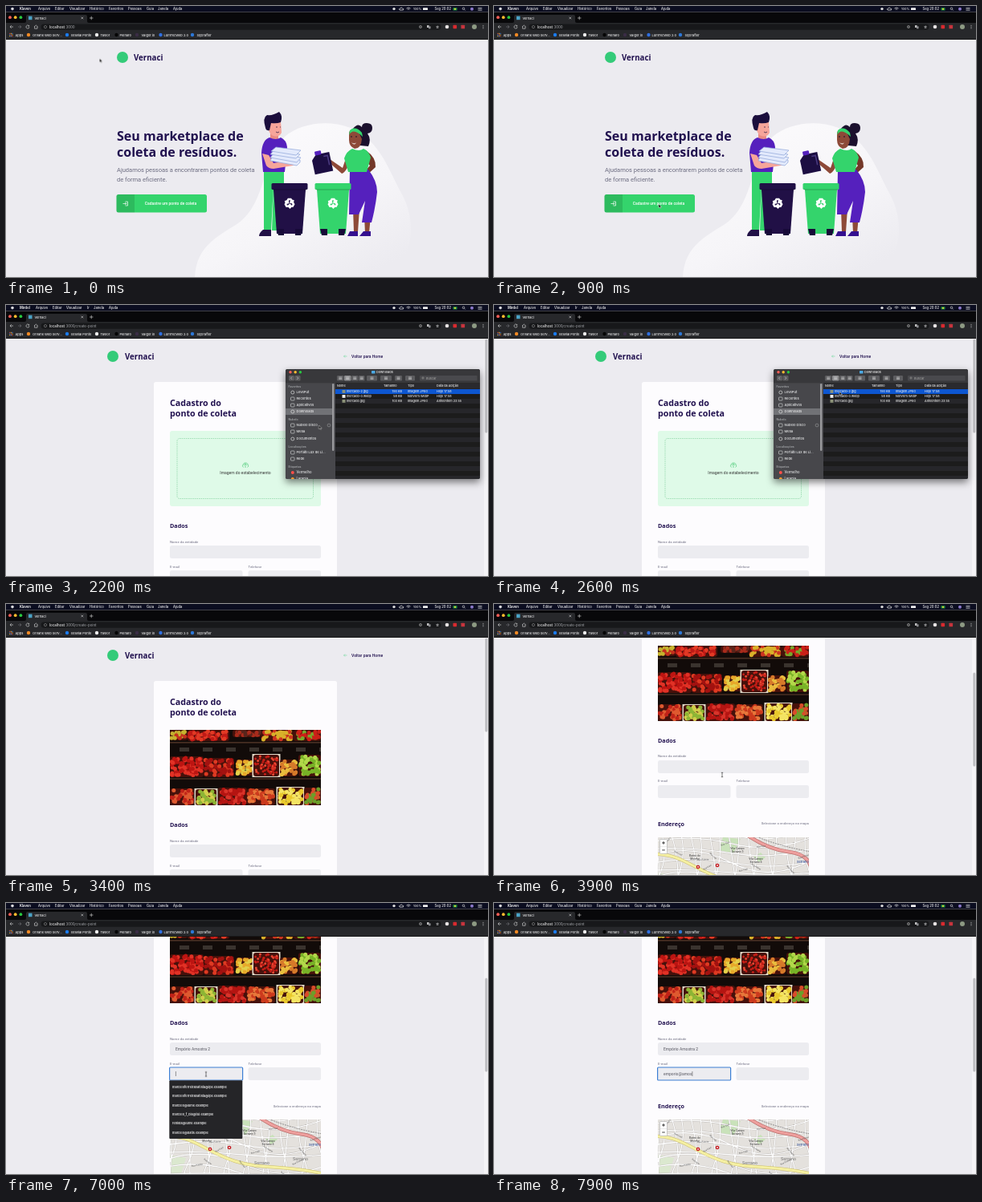
Animation, 600 px wide and 338 px high, one loop 8 s. Source, as an HTML page:

```html
<!DOCTYPE html>
<html lang="pt-BR">
<head>
<meta charset="utf-8">
<title>Vernaci</title>
<style>
html, body { margin: 0; width: 100%; height: 100%; overflow: hidden; background: #ecebf0; }
svg { display: block; width: 600px; height: 338px; }
text { white-space: pre; }
.ui { font-family: Inter, "Liberation Sans", sans-serif; font-size: 4.15px; font-weight: 500; fill: #e9e9ea; }
.body { font-family: Roboto, Arial, sans-serif; fill: #6c6c80; font-size: 4.35px; }
.head { font-family: "Open Sans", "Noto Sans", sans-serif; font-weight: 700; fill: #21114f; }
.field { fill: #ececf0; }
.value { font-size: 5px; fill: #55555f; }

.home, .create, .files, .web, .photo, .arrow, .beam, .ghost { animation: 8s step-end infinite; }
.create, .files, .photo, .beam, .ghost { visibility: hidden; }
.home { animation-name: home; }
.create { animation-name: create; }
.files { animation-name: files; }
.web { animation-name: web; }
.photo { animation-name: photo; }
.arrow { animation-name: arrow; }
.beam { animation-name: beam; }
.ghost { animation-name: ghost; }
@keyframes home { 0% { visibility: visible } 13.75% { visibility: hidden } }
@keyframes create { 0% { visibility: hidden } 13.75% { visibility: visible } }
@keyframes files { 0% { visibility: hidden } 25% { visibility: visible } 41.875% { visibility: hidden } }
@keyframes web { 0% { visibility: visible } 25% { visibility: hidden } 41.875% { visibility: visible } }
@keyframes photo { 0% { visibility: hidden } 39.4% { visibility: visible } }
@keyframes arrow { 0% { visibility: visible } 16% { visibility: hidden } 26% { visibility: visible } 42.5% { visibility: hidden } }
@keyframes beam { 0% { visibility: hidden } 42.5% { visibility: visible } 58% { visibility: hidden } 79.5% { visibility: visible } 91.25% { visibility: hidden } }
@keyframes ghost { 0% { visibility: hidden } 34.5% { visibility: visible } 39.4% { visibility: hidden } }

.scroll { animation: scroll 8s linear infinite; }
@keyframes scroll { 0%, 43.75% { transform: translateY(0) } 48.75% { transform: translateY(-105px) } 52.5%, 100% { transform: translateY(-126px) } }
.thumb { animation: thumb 8s linear infinite; }
@keyframes thumb { 0%, 43.75% { transform: translateY(0) } 48.75% { transform: translateY(43px) } 52.5%, 100% { transform: translateY(51px) } }
.arrowPath { animation: arrowPath 8s ease-in-out infinite; }
@keyframes arrowPath {
  0%, 2.5% { transform: translate(116.5px, 65.5px) }
  9.5%, 16% { transform: translate(205px, 247px) }
  26% { transform: translate(380px, 160px) }
  31%, 34.5% { transform: translate(430px, 108px) }
  39.4%, 100% { transform: translate(298px, 205px) }
}
.beamPath { animation: beamPath 8s ease-in-out infinite; }
@keyframes beamPath {
  0%, 42.5% { transform: translate(298px, 205px) }
  47.5%, 52.5% { transform: translate(284px, 213px) }
  56.25%, 79.5% { transform: translate(270px, 183px) }
  83.75%, 100% { transform: translate(249px, 213.5px) }
}
</style>
</head>
<body>
<svg viewBox="0 0 600 338">
  <defs>
    <linearGradient id="blob" x1=".25" y1=".1" x2=".85" y2=".95">
      <stop offset="0" stop-color="#fbfafc"/><stop offset=".55" stop-color="#f6f5f8"/><stop offset="1" stop-color="#ecebf0"/>
    </linearGradient>
    <clipPath id="view"><rect y="42" width="600" height="296"/></clipPath>
    <clipPath id="photoBox"><rect x="204" y="157" width="188" height="94"/></clipPath>
    <clipPath id="mapBox"><rect x="204" y="396" width="188" height="109" rx="1"/></clipPath>
    <clipPath id="filesBox"><rect x="348" y="80" width="242" height="137" rx="2.5"/></clipPath>
    <filter id="shadow" x="-10%" y="-10%" width="120%" height="130%"><feDropShadow dx="0" dy="4" stdDeviation="5" flood-opacity=".5"/></filter>
    <g id="recycle" fill="none" stroke="#fff" stroke-width="2.6">
      <path id="bend" d="M-3.6 -1.4L-1.4 -5H1.4L3 -2.4M4.5 -4.2L3.6 -.8L.4 -1.8"/>
      <use href="#bend" transform="rotate(120)"/><use href="#bend" transform="rotate(240)"/>
    </g>
    <g id="bin">
      <rect x="-22.5" width="45" height="8" rx="1.5"/>
      <path d="M-20 8H20L16 63H-16Z"/>
      <path d="M-16 57h9v8h-7zM7 57h9l-2 8H7z" fill="#170a38"/>
      <path d="M-21 8H21" stroke="#000" stroke-opacity=".25"/>
      <use href="#recycle" transform="translate(0 25)"/>
    </g>
  </defs>
  <rect width="600" height="338" fill="#ecebf0"/>

  <g class="home">
    <path fill="url(#blob)" d="M235 338C237 303 258 290 286 273C325 248 318 190 347 163C374 140 426 140 453 168C472 188 478 207 493 235C512 270 505 312 482 338Z"/>
    <circle cx="145" cy="64" r="7" fill="#34cb79"/>
    <g class="head">
      <text x="159" y="67.7" font-size="9.7">Vernaci</text>
      <text font-size="16"><tspan x="138" y="168">Seu marketplace de</tspan><tspan x="138" y="187.5">coleta de resíduos.</tspan></text>
    </g>
    <g class="body">
      <text font-size="7.5"><tspan x="138" y="207">Ajudamos pessoas a encontrarem pontos de coleta</tspan><tspan x="138" y="219">de forma eficiente.</tspan></text>
      <rect x="137.5" y="235" width="112.5" height="22.5" rx="2.5" fill="#34d46c"/>
      <path d="M160 235v22.5h-20a2.5 2.5 0 0 1-2.5-2.5v-17.5a2.5 2.5 0 0 1 2.5-2.5z" fill="#000" opacity=".12"/>
      <path d="M148.5 244h3v5h-3M145.5 246.5h4.3m-1.5-1.6l1.6 1.6l-1.6 1.6" fill="none" stroke="#fff" stroke-width=".7"/>
      <text x="205" y="248.3" text-anchor="middle" font-size="5" font-weight="500" fill="#fff">Cadastre um ponto de coleta</text>
    </g>
    <!-- man -->
    <path d="M321 206H346V230L338 280H331L333 225L330 280H321Z" fill="#34d46c"/>
    <path d="M320 279H330V287H315Q315 283 320 279Z" fill="#211046"/>
    <path d="M329 156H339V167H329Z" fill="#e98b83"/>
    <path d="M326 144H342L343 158Q340 164 333 162Q327 160 326 150Z" fill="#f6a59a"/>
    <path d="M323 152Q319 139 325 136Q332 137 340 132Q345 137 342 145Q337 147 330 146L328 155Q324 156 323 152Z" fill="#1a0d3c"/>
    <path d="M336 151h2m3 0h1M336 157q2 2 4 0" stroke="#1a0d3c" stroke-width=".7" fill="none"/>
    <path d="M328 164Q336 168 342 164Q349 167 350 176L347 207H320L318 183Q319 167 328 164Z" fill="#5520bd"/>
    <path d="M319 184L327 186L333 196L355 192L363 196L357 199L333 203Q327 203 324 199Z" fill="#f6a59a"/>
    <g fill="#e3eafc" stroke="#8ea5d8" stroke-width=".7">
      <path d="M329 193L362 199L366 195V192L332 186Z"/>
      <path d="M329 189L362 195L367 189L334 183Z"/><path d="M329 185L361 190L366 185L334 179Z"/>
      <path d="M330 181L361 186L367 180L336 176Z"/>
    </g>
    <!-- woman -->
    <path d="M449 146q7 0 7 6t-6 7q5 7 1 16l-20-2 1-20q6-8 11-2q0-5 6-5z" fill="#1b102d"/>
    <path d="M427 158Q429 152 438 155L443 166Q442 178 434 178Q427 175 427 167Z" fill="#8d4938"/>
    <path d="M427 161Q432 151 444 163L443 158Q435 149 428 155Z" fill="#34d46c"/>
    <path d="M430 170q4 3 6 0q-2 5-6 0z" fill="#fff"/>
    <path d="M429 163h2m4 0h2" stroke="#1b102d"/>
    <path d="M425 184L419 202L403 191L402 195L418 209Q423 208 430 191Z" fill="#8d4938"/>
    <path d="M448 180Q461 189 460 201L449 211L446 207L453 199L445 190Z" fill="#743829"/>
    <path d="M432 253H440L438 282H433ZM446 262H454L452 283H447Z" fill="#8d4938"/>
    <path d="M428 204H451Q462 218 462 232Q460 251 455 270H443L447 243L439 260H427Z" fill="#5520bd"/>
    <path d="M431 178Q440 182 445 178Q452 181 454 189L449 207H426L421 190Q424 181 431 178Z" fill="#34d46c"/>
    <path d="M428 281h10v6h-13zM445 281h9v6h-14z" fill="#35108f"/>
    <g transform="rotate(-12 394 196)">
      <path d="M382 190L388 184H405V208H382Z" fill="#1c0e42"/>
      <rect x="387" y="180" width="8" height="5" rx="1" fill="#5520bd"/>
      <path d="M397 188H402V200" fill="none" stroke="#4a3a80" stroke-width="1.5"/>
    </g>
    <use href="#bin" transform="translate(353 221)" fill="#211046"/>
    <use href="#bin" transform="translate(407 221)" fill="#34d46c"/>
  </g>

  <g class="create" clip-path="url(#view)">
    <g class="scroll">
      <circle cx="133" cy="64" r="7" fill="#34cb79"/>
      <text class="head" x="148" y="67.7" font-size="9.7">Vernaci</text>
      <path d="M424.5 64h-4m1.5-1.5l-1.5 1.5l1.5 1.5" stroke="#70d99b" stroke-width=".6" fill="none"/>
      <rect x="184" y="96" width="228" height="480" rx="2.5" fill="#fdfcfe"/>
      <g class="head">
        <text font-size="10.7"><tspan x="204" y="126.3">Cadastro do</tspan><tspan x="204" y="139.3">ponto de coleta</tspan></text>
        <text x="204" y="277.6" font-size="7.2">Dados</text>
        <text x="204" y="381.6" font-size="7.2">Endereço</text>
      </g>
      <rect x="204" y="157" width="188" height="94" rx="3" fill="#dffae8"/>
      <rect x="213" y="166.5" width="169.5" height="75" rx="3" fill="none" stroke="#79cd98" stroke-width=".6" stroke-dasharray="1.6 1"/>
      <path d="M298 203v-5m-2 1.8l2-2l2 2M295.5 202.5q-2-1.5-.3-3.7q1-2.7 4-1.8q2 .8 2 2.3q1.5 2-.7 3.2" fill="none" stroke="#4ecb79" stroke-width=".7"/>
      <text class="body" x="298" y="211" text-anchor="middle" style="font-size:5px;fill:#333">Imagem do estabelecimento</text>
      <g class="photo" clip-path="url(#photoBox)" id="photo"></g>
      <g class="body">
        <text x="430" y="65.8" font-size="5" font-weight="500" fill="#21114f">Voltar para Home</text>
        <text x="204" y="296.5">Nome da entidade</text>
        <text x="204" y="327.5">E-mail</text>
        <text x="301.5" y="327.5">Telefone</text>
        <text x="392" y="380.5" text-anchor="end">Selecione o endereço no mapa</text>
        <rect class="field" x="204" y="300" width="188" height="16" rx="2.5"/>
        <rect class="field" x="204" y="331" width="90.5" height="16" rx="2.5"/>
        <rect class="field" x="301.5" y="331" width="90.5" height="16" rx="2.5"/>
        <rect id="ring" x="203.6" y="300" width="188.8" height="16" rx="1" fill="none" stroke="#3c7fd4" stroke-width="1.2"/>
        <text id="name" class="value" x="211" y="309.8"></text>
        <text id="mail" class="value" x="211" y="340.8"></text>
        <path id="caret" d="M0 0v6" stroke="#333" stroke-width=".5"/>
      </g>
      <g id="map" class="ui" clip-path="url(#mapBox)"></g>
      <g id="drop" class="ui"></g>
    </g>
    <rect x="595" y="42" width="5" height="296" fill="#f4f3f6"/>
    <rect class="thumb" x="596.3" y="42.5" width="3" height="117" rx="1.5" fill="#bdbdc1"/>
  </g>

  <g id="browser" class="ui"></g>
  <g class="files"><g filter="url(#shadow)"><g id="files" class="ui" clip-path="url(#filesBox)"></g></g></g>

  <g class="arrowPath"><g class="arrow">
    <path d="M0 0V4.8L1.2 3.7L2 5.4L2.8 5L2 3.4H3.5Z" fill="#111" stroke="#fff" stroke-width=".4"/>
    <g class="ghost" opacity=".7"><rect x="-11" y="-2" width="4" height="4" fill="#d8d8d8"/><rect x="-6" y="-2.5" width="30" height="5" rx="1" fill="#0b5bd3"/><text class="ui" x="-5" y="1.5">mercado-2.jpg</text></g>
  </g></g>
  <g class="beamPath"><path class="beam" d="M-1.2 -2.7H1.2M0 -2.7V2.7M-1.2 2.7H1.2" stroke="#222" stroke-width=".6"/></g>
</svg>
<script>
const $ = id => document.getElementById(id);
const text = (x, y, s, a = '') => `<text x="${x}" y="${y}" ${a}>${s}</text>`;
const rect = (x, y, w, h, fill, a = '') => `<rect x="${x}" y="${y}" width="${w}" height="${h}" fill="${fill}" ${a}/>`;
const dot = (x, y, r, fill, a = '') => `<circle cx="${x}" cy="${y}" r="${r}" fill="${fill}" ${a}/>`;
const line = (d, color, w = .6, a = '') => `<path d="${d}" fill="none" stroke="${color}" stroke-width="${w}" ${a}/>`;
const lights = (x, y, gap, r) => ['#ff5f57', '#febc2e', '#28c840'].map((c, i) => dot(x + i * gap, y, r, c)).join('');
const bold = 'font-weight="700"';

let seed = 7;
const rand = () => (seed = seed * 16807 % 2147483647) / 2147483647;

function menu(cls, items) {
  return `<g class="${cls}">` + items.map(([x, s], i) => text(x, 5, s, i ? '' : bold)).join('') + '</g>';
}

function drawBrowser() {
  let s = rect(0, 0, 600, 7.5, '#0b0d20') + rect(0, 7.5, 600, 13.5, '#08080a')
    + rect(0, 21, 600, 21, '#27282b') + rect(0, 41.3, 600, .7, '#111')
    + dot(8, 3.6, 1.8, '#d8d8dc');
  s += menu('web', [[17, 'Klaven'], [40, 'Arquivo'], [61, 'Editar'], [79, 'Visualizar'], [104, 'Histórico'],
    [128, 'Favoritos'], [152, 'Pessoas'], [175, 'Guia'], [189, 'Janela'], [208, 'Ajuda']]);
  s += menu('files', [[17, 'Mirdel'], [37, 'Arquivo'], [58, 'Editar'], [75, 'Visualizar'], [101, 'Ir'], [109, 'Janela'], [128, 'Ajuda']]);
  s += dot(483, 3.6, 1.7, '#ddd') + line('M490 5h4.5q1-2-1-2q-1-2-3 0q-2 .5-.5 2z', '#ddd', .8)
    + line('M498.5 3q2.5-2 5 0M499.7 4.3q1.3-1 2.6 0', '#eee', .7)
    + text(507, 5, '100%', 'font-size="3.8"') + rect(519, 2.3, 6, 2.8, '#eee', 'rx=".6"') + text(533.5, 5, 'Seg 20:02')
    + rect(556.5, 2.2, 5, 3.3, '#1f9547') + dot(559, 3.85, 1.1, '#f2d335')
    + dot(569.5, 3.3, 1.3, 'none', 'stroke="#eee" stroke-width=".6"') + line('M570.5 4.3l1.2 1.2', '#eee')
    + dot(580, 3.7, 2, '#8a78c9') + line('M587.5 2.3h5m-5 1.5h5m-5 1.5h5', '#eee');
  s += lights(5, 14.2, 6.7, 1.9)
    + '<path d="M23 21q2 0 2-2v-6q0-2 2-2h72q2 0 2 2v6q0 2 2 2z" fill="#27282b"/>'
    + rect(28, 12.7, 4.5, 4.5, '#4aa3c7') + text(35.5, 16.6, 'Vernaci', 'font-size="3.9"')
    + line('M93.5 13.7l2.6 2.6m0-2.6l-2.6 2.6M104 15h4.5m-2.25-2.25v4.5', '#ddd');
  s += line('M9 26H5m1.8-1.8L5 26l1.8 1.8', '#ddd') + line('M15 26h4m-1.8-1.8L19 26l-1.8 1.8', '#77787c')
    + line('M28.5 24.7a2 2 0 1 0 .5 1.5m-.3-2.3v1.3h-1.3', '#ddd') + line('M35 26l2.3-2l2.3 2m-4-.5v2.7h3.4v-2.7', '#ddd')
    + rect(43.5, 22.5, 498, 7.2, '#17181a', 'rx="3.6"') + dot(49, 26.1, 1.6, 'none', 'stroke="#aaa" stroke-width=".5"')
    + text(54, 27.6, 'localhost<tspan fill="#8f9195">:3000</tspan>', 'font-size="4.4"')
    + `<g class="create">${text(85, 27.6, '/create-point', 'font-size="4.4" fill="#8f9195"')}</g>`
    + dot(516, 26, 1.6, 'none', 'stroke="#aaa" stroke-width=".6"') + dot(516, 26, .7, '#aaa')
    + rect(524, 24, 2.6, 3, '#bbb') + rect(526, 25.3, 2.6, 3, '#8a8a8f')
    + text(534.5, 28, '☆', 'font-size="5"')
    + dot(549, 26, 2.3, '#e8e4e4') + rect(556.5, 23.7, 4.6, 4.6, '#d92a2f', 'rx=".8"')
    + rect(566.5, 23.7, 4.6, 4.6, '#c8343d', 'rx=".6"') + dot(583, 26, 3, '#8d9a83');
  for (let i = 0; i < 3; i++) s += dot(594, 24.3 + i * 1.7, .5, '#ddd');
  for (let i = 0; i < 9; i++)
    s += rect(4.2 + i % 3 * 1.6, 33.8 + (i / 3 | 0) * 1.6, 1.1, 1.1, ['#e5533d', '#4c8bf5', '#f3b72f'][(i * 2 + (i / 3 | 0)) % 3]);
  s += text(11.5, 37.6, 'Apps', 'font-size="4"');
  [[28, 33, 'Orvane Web Serv...', '#f08a24'], [76, 81.3, 'Bravial Ponte', '#1b7cf0'], [113, 117.5, 'Tavlor', '#eee'],
   [137.5, 141.5, 'Plenaro', '#050505'], [163, 168.5, 'Valgor.io', '#3a2d45'], [192.5, 196.5, 'LumTecWeb 2.0', '#2f6fe0'],
   [232, 237.5, 'SqDrafter', '#2d78d8']].forEach(([ix, x, name, c]) =>
    s += dot(ix, 36, 2.2, c) + text(x, 37.6, name, 'font-size="4"'));
  $('browser').innerHTML = s;
}

function drawFiles() {
  let s = rect(348, 80, 242, 137, '#1d1d1f') + rect(348, 80, 62, 137, '#46474b') + rect(348, 80, 242, 17.3, '#39393b')
    + lights(354, 83.7, 6.2, 1.7) + rect(455, 82, 4.5, 3.4, '#4ba9e4', 'rx=".6"') + text(461, 85.3, 'Downloads', 'font-size="3.9"');
  [[352, 7], [359.5, 7], [412, 8.5], [421, 8.5], [430, 8.5], [439, 7.5], [449, 13], [466, 14], [484, 9], [497, 12]].forEach(([x, w], i) =>
    s += rect(x, 88, w, 6.5, i === 3 ? '#8b8b8e' : '#5b5b5e', 'rx="1.2"') + (i > 1
      ? line(`M${x + w / 2 - 2} 90h4m-4 1.3h4m-4 1.3h4`, '#ddd', .6)
      : line(i ? 'M362.3 89.6l1.5 1.6l-1.5 1.6' : 'M356 89.6l-1.5 1.6l1.5 1.6', '#ddd')));
  s += rect(515, 88, 71.5, 6.5, '#4a4a4d', 'rx="1.2"') + dot(519, 91, 1.1, 'none', 'stroke="#aaa" stroke-width=".5"')
    + text(523, 92.7, 'Buscar', 'font-size="3.8" fill="#999"');
  for (let i = 0; i < 20; i += 2) s += rect(410, 105 + i * 6, 180, 6, '#28282a');
  s += rect(410, 97.3, 180, 7.4, '#2c2c2e') + rect(410, 105, 180, 6, '#0b57d0');
  const f = 'font-size="3.75"';
  [[412, 'Nome'], [470, 'Tamanho'], [500, 'Tipo'], [536, 'Data da Adição']].forEach(([x, n]) => s += text(x, 102.4, n, f));
  [['mercado-2.jpg', '190 KB', 'Imagem JPEG', 'Hoje 17:58'], ['mercado-0.webp', '58 KB', "Norvel's WebP", 'Hoje 17:58'],
   ['mercado.jpg', '103 KB', 'Imagem JPEG', 'Anteontem 23:55']].forEach(([n, size, kind, date], i) => {
    const y = 109.4 + i * 6;
    s += rect(418.5, y - 3.4, 4, 3.8, i === 1 ? '#eee' : '#8c9278') + text(424, y, n, f)
      + text(493, y, size, f + ' text-anchor="end"') + text(500, y, kind, f) + text(536, y, date, f);
  });
  s += rect(348, 129, 59, 8, '#717276');
  [[102, 'Favoritos'], [143, 'Nubelo'], [177, 'Localizações'], [202, 'Etiquetas']].forEach(([y, n]) =>
    s += text(351.5, y + 1.3, n, 'font-size="3.5" font-weight="600" fill="#a5a6a9"'));
  [[109, 'LevePut'], [117, 'Recentes'], [125, 'Aplicativos'], [133, 'Downloads'], [150, 'Nubelo Disco'], [158, 'Mesa'],
   [167, 'Documentos'], [184, 'Portátil Lux de Li...'], [192, 'Rede']].forEach(([y, n], i) =>
    s += (i % 3 ? rect(354.5, y - 2, 4.5, 4, 'none', 'rx=".7" stroke="#ddd" stroke-width=".6"')
      : dot(356.8, y, 2, 'none', 'stroke="#ddd" stroke-width=".7"')) + text(361.5, y + 1.4, n, 'font-size="4.1"'));
  s += dot(356.8, 209, 2, '#ff4f4a') + text(361.5, 210.4, 'Vermelho') + dot(356.8, 217, 2, '#ff9d2b') + text(361.5, 218.4, 'Laranja')
    + dot(402, 150, 1.9, 'none', 'stroke="#aaa" stroke-width=".5"') + rect(406, 98, 2.4, 84, '#9a9a9d', 'rx="1.2"');
  $('files').innerHTML = s;
}

// Crates: x, y, width, height, main tone, second tone
function drawPhoto() {
  let s = rect(204, 157, 188, 94, '#120b09');
  [[204, 157, 22, 13, '#c5b32e', '#c3301d'], [226, 157, 52, 14, '#c01a16', '#e23a25'], [282, 157, 36, 9, '#57251c', '#a82b1c'],
   [318, 157, 40, 14, '#d9b12a', '#cc3320'], [358, 157, 34, 14, '#cb2118', '#77a92b'],
   [204, 190, 42, 26, '#bd1512', '#e13226'], [246, 192, 38, 24, '#a31210', '#de3a22'], [286, 194, 22, 20, '#e7a82a', '#e3d04a'],
   [308, 188, 32, 27, '#c21d16', '#e94733'], [341, 194, 22, 21, '#d7792a', '#e9be3e'], [364, 188, 28, 27, '#78b327', '#b3d84a'],
   [204, 230, 30, 21, '#c02218', '#df5a30'], [236, 231, 26, 20, '#8db535', '#d3cd4b'], [264, 229, 36, 22, '#b51512', '#d9342a'],
   [300, 230, 35, 21, '#cc3a1d', '#e7773a'], [338, 229, 32, 22, '#e9c92c', '#f4e463'], [371, 229, 21, 22, '#6c9f2a', '#d94d2a']
  ].forEach(([x, y, w, h, a, b], i) => {
    if (i === 8 || i === 12 || i === 15) s += rect(x - 1.5, y - 1, w + 3, h + 2, '#e5dccb');
    s += rect(x, y, w, h, '#46110b', 'rx="3"');
    for (let k = 0; k < w * h / 13; k++)
      s += dot((x + 2 + rand() * (w - 4)).toFixed(1), (y + 2 + rand() * (h - 4)).toFixed(1), i === 8 ? 1.5 : 2.5, rand() < .6 ? a : b);
  });
  s += rect(204, 172, 188, 1.6, '#4a3024') + rect(204, 217, 188, 2, '#3c261c');
  for (let x = 216; x < 392; x += 29) s += rect(x, 179, 12, 5, '#3a332e');
  $('photo').innerHTML = s;
}

function drawMap() {
  let s = rect(204, 396, 188, 109, '#e4e1dd'), streets = '';
  for (let i = 0; i < 18; i++) {
    const x = 196 + i * 12;
    streets += `M${x} 390q${12 - i} 30 ${i % 2 ? -6 : 9} 62t${8 - i} 60`;
    if (i < 13) streets += `M200 ${392 + i * 9}q48 ${i % 3 * 7 - 16} 96 ${i % 4 * 3}t100 ${i * 2 - 10}`;
  }
  s += '<path d="M285 396l22 2l-9 18l-18-4zM323 420l9-5l6 6l-8 6z" fill="#c9e2ba"/><path d="M204 440l20 4l-8 26l-12 2z" fill="#dbe8cf"/>'
    + line(streets, '#bcb8b5', 2) + line(streets, '#fdfdfd', 1.3);
  const main = 'M204 417C235 418 250 437 285 448S342 452 392 463';
  const highway = 'M316 394Q342 411 366 414T394 432';
  s += line(main, '#c9bb6c', 4) + line(main, '#f5f0a2', 3) + line(highway, '#b66a68', 4.5) + line(highway, '#ee9f9d', 3.2)
    + line('M322 393Q350 406 394 414', '#777', .8, 'stroke-dasharray="2 1"');
  const tiny = 'font-size="3.2" fill="#444" text-anchor="middle"';
  [[303, 411, 'Vila Campo'], [303, 415, 'Serrano 3'], [326, 424, 'Vila Campo'], [326, 428, 'Serrano 4'],
   [250, 420, 'Bairro do'], [250, 424, 'Moinho']].forEach(([x, y, n]) => s += text(x, y, n, tiny));
  for (let i = 0; i < 16; i++) {
    const x = 216 + i * 37 % 170, y = 402 + i * 23 % 62;
    s += text(x, y, 'Rua ' + ['Araral', 'Pinhão', 'Luar', 'Cipó'][i % 4], `font-size="2.7" fill="#666" transform="rotate(${i * 53 % 110 - 55} ${x} ${y})"`);
  }
  s += text(309, 451.5, 'Serrano', 'font-size="5" fill="#777"') + text(357, 447, 'Serrano', 'font-size="5" fill="#777"')
    + text(377, 428.5, 'Serrano', 'font-size="3.9" fill="#35539a"');
  [[254, 433], [278, 431]].forEach(([x, y]) => s += dot(x, y, 2.3, '#c4161c') + rect(x - .8, y - .8, 1.6, 1.6, '#fff'));
  s += rect(206.5, 398.5, 9, 18, '#fff', 'rx="1" stroke="#aaa" stroke-width=".6"')
    + line('M207 407.5h8', '#ccc', .4) + line('M209.2 403h3.6m-1.8-1.8v3.6M209.2 412h3.6', '#111', .8);
  $('map').innerHTML = s;
}

const names = ['Empório da dona Bia', 'Empório amostra', 'Empório Flor-Mel'];
const mails = ['marceloferreirabatista@ipe.example', 'marceloferreirabatista@ipe.example', 'marcelo@lume.example',
  'marcelo_f_bia@tui.example', 'renilda@lume.example', 'marcelo@batis.example'];

function drawDrop(list, typed, y, w) {
  const rows = list.filter(n => n.toLowerCase().startsWith(typed.toLowerCase()));
  $('drop').innerHTML = rows.length ? rect(203.3, y, w, rows.length * 11.3 + 5, '#252528', 'rx="1"')
    + rows.map((n, i) => text(207, y + 9.8 + i * 11.3, n, 'font-size="3.85" font-weight="600"')).join('') : '';
}

const typedCount = (t, start, step, max) => Math.max(0, Math.min(max, Math.floor((t - start) / step) + 1));

let last;
function update(t) {
  const name = 'Empório Amostra 2'.slice(0, t < 5400 ? typedCount(t, 4700, 60, 8) : 8 + typedCount(t, 5400, 95, 9));
  const mail = 'emporio@amos'.slice(0, typedCount(t, 7300, 50, 12));
  const focus = t < 4550 ? '' : t < 6700 ? 'name' : 'mail';
  const state = name + mail + focus;
  if (state === last) return;
  last = state;
  $('name').textContent = name;
  $('mail').textContent = mail;
  $('ring').style.display = $('caret').style.display = focus ? '' : 'none';
  $('drop').innerHTML = '';
  if (!focus) return;
  const isName = focus === 'name', y = isName ? 300 : 331;
  $('ring').setAttribute('y', y);
  $('ring').setAttribute('width', isName ? 188.8 : 91);
  const typed = isName ? name : mail;
  const end = 211.4 + (typed ? $(focus).getComputedTextLength() : 0);
  $('caret').setAttribute('transform', `translate(${end} ${y + 5})`);
  if (!isName) drawDrop(mails, mail, 347.3, 91);
  else if (name) drawDrop(names, name, 316.5, 60);
}

drawBrowser();
drawFiles();
drawPhoto();
drawMap();
update(0);
let start;
function tick() {
  const now = performance.now();
  start ??= now;
  update((now - start) % 8000);
  requestAnimationFrame(tick);
}
requestAnimationFrame(tick);
</script>
</body>
</html>
```
